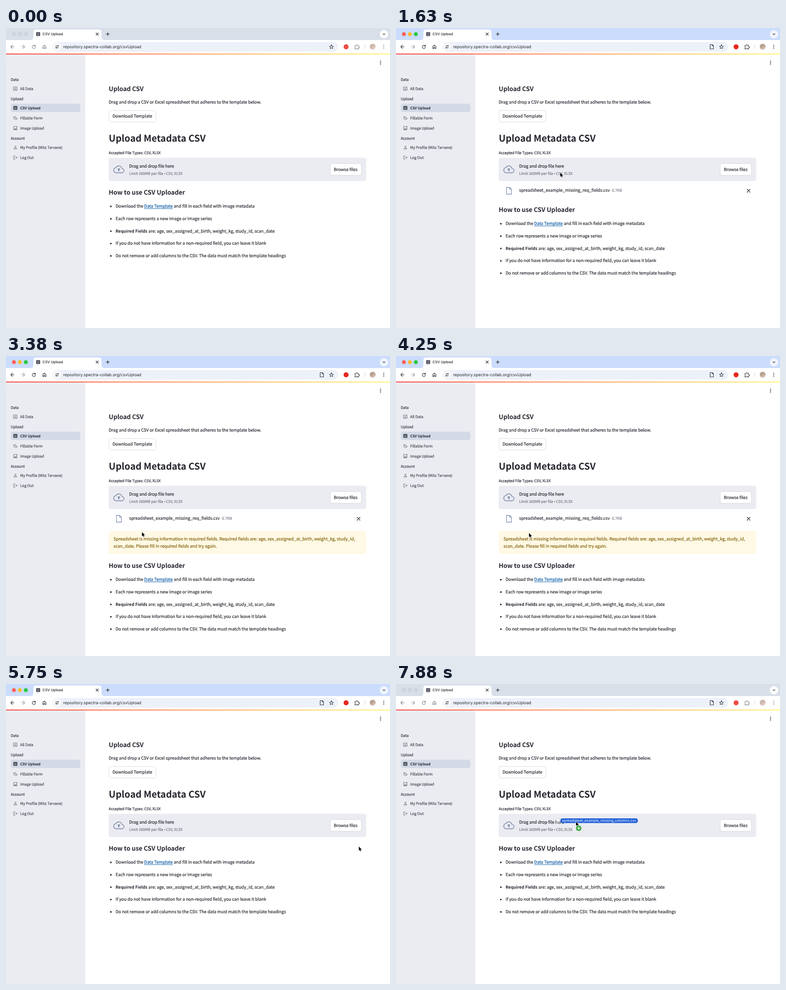
These frames come from a looping animation (800x623 px, 8 s). An HTML page with a canvas:

```html
<!DOCTYPE html>
<html lang="en">
<head>
<meta charset="utf-8">
<title>CSV Upload</title>
<style>
html, body { margin: 0; width: 100%; height: 100%; overflow: hidden; background: #fff; }
canvas { display: block; width: 800px; height: 623px; }
</style>
</head>
<body>
<canvas id="stage"></canvas>
<script>
const W = 800, H = 623, LOOP = 8000, STEP = 125;
const canvas = document.getElementById('stage');
const ctx = canvas.getContext('2d');
const dpr = window.devicePixelRatio || 1;
canvas.width = W * dpr;
canvas.height = H * dpr;

const PAGE_FONT = '"Noto Sans CJK JP", "Noto Sans CJK SC", "Noto Sans CJK KR", "Noto Sans", sans-serif';
const UI_FONT = 'Inter, Roboto, sans-serif';
const INK = '#262730', BODY = '#25262f', MUTED = '#777983', PANEL = '#ebecf1', STEEL = '#8592b3';
const BODY_SIZE = 8.83, SMALL = 7.7;

// Event times in ms
const DROP = 1250, FOCUS = 1375, FILE_IN = 1500, WARN_IN = 2000;
const HOVER = 5375, FILE_OUT = 5625, LEAVE = 6250, BLUR = 6500, DRAG_2 = 7250;

const PATH_1 = [
  [125, 650, 385], [500, 470, 322], [875, 367, 294.2], [1250, 345, 300],
  [2375, 336.5, 301], [2750, 300, 345], [3500, 280, 370], [4250, 277, 367.5],
  [4625, 330, 362], [5125, 640, 345], [5375, 735, 337.5], [5875, 735, 337.5],
  [6000, 750, 348], [6125, 778, 360], [6250, 800, 366]
];
const PATH_2 = [[7250, 690, 470], [7500, 540, 375], [7875, 375, 286]];

function along(path, t) {
  let i = 0;
  while (i < path.length - 2 && t > path[i + 1][0]) i++;
  const [t0, x0, y0] = path[i], [t1, x1, y1] = path[i + 1];
  const k = Math.min(1, Math.max(0, (t - t0) / (t1 - t0)));
  return [x0 + (x1 - x0) * k, y0 + (y1 - y0) * k];
}

// Text is placed by the middle of its capitals; returns the end x.
function text(str, x, mid, { size = BODY_SIZE, color = BODY, weight = 400, font = PAGE_FONT } = {}) {
  const baseline = mid + size * 0.345;
  ctx.font = `${weight} ${size}px ${font}`;
  ctx.fillStyle = color;
  ctx.fillText(str, x, baseline);
  if (font === PAGE_FONT && weight === 400) {
    // Slight emboldening, as with smoothed screen text
    ctx.strokeStyle = color;
    ctx.lineWidth = 0.2;
    ctx.strokeText(str, x, baseline);
  }
  return x + ctx.measureText(str).width;
}

function box(x, y, w, h, r, fill, stroke) {
  ctx.beginPath();
  ctx.roundRect(x, y, w, h, r);
  if (fill) { ctx.fillStyle = fill; ctx.fill(); }
  if (stroke) { ctx.strokeStyle = stroke; ctx.lineWidth = 0.8; ctx.stroke(); }
}

function dot(x, y, r, fill) {
  ctx.beginPath();
  ctx.arc(x, y, r, 0, Math.PI * 2);
  ctx.fillStyle = fill;
  ctx.fill();
}

// SVG path drawn around (x, y)
function glyph(d, x, y, { stroke, fill, width = 1.1, scale = 1 }) {
  const p = new Path2D(d);
  ctx.save();
  ctx.translate(x, y);
  ctx.scale(scale, scale);
  ctx.lineJoin = ctx.lineCap = 'round';
  if (fill) { ctx.fillStyle = fill; ctx.fill(p); }
  if (stroke) { ctx.strokeStyle = stroke; ctx.lineWidth = width; ctx.stroke(p); }
  ctx.restore();
}

const CROSS = 'M-3 -3L3 3M3 -3L-3 3';
const ARROW_LEFT = 'M3.5 0H-3.5M0 -3.5L-3.5 0L0 3.5';
const PAGE = 'M-3.5 -4.5H1L3.5 -2V4.5H-3.5ZM1 -4.5V-2H3.5';

function tableIcon(x, y) {
  box(x - 4, y - 4, 8, 8, 1, INK);
  ctx.fillStyle = '#e6e9f2';
  for (const row of [-2.4, -0.2, 2]) ctx.fillRect(x - 2.9, y + row, 5.8, 0.9);
}

function kebab(x, y, gap, r, color) {
  for (const k of [-1, 0, 1]) dot(x, y + k * gap, r, color);
}

function drawTabs(active) {
  ctx.fillStyle = active ? '#cbdcfc' : '#d8dfe9';
  ctx.fillRect(0, 0, W, 25);
  const lights = active ? ['#ff5f57', '#febc2e', '#28c840'] : Array(3).fill('#c5cbd4');
  lights.forEach((color, i) => {
    dot(16.5 + i * 12.4, 12.8, 4, color);
    if (!active) dot(16.5 + i * 12.4, 12.8, 3.3, '#d0d6df');
  });
  glyph('M51 25Q57 25 57 19V9Q57 3 63 3H193Q199 3 199 9V19Q199 25 205 25Z', 0, 0, { fill: '#fff' });
  tableIcon(67, 12.8);
  text('CSV Upload', 76, 12.5, { size: 7.4, color: '#202124', weight: 500, font: UI_FONT });
  glyph(CROSS, 190, 12.6, { stroke: '#303338', width: 1.4, scale: 0.8 });
  glyph('M-3.3 0H3.3M0 -3.3V3.3', 212, 12.6, { stroke: '#303338', width: 1.2 });
  dot(787.5, 12.8, 8.6, active ? '#eff4fe' : '#fff');
  glyph('M-2 -1L0 1L2 -1', 787.5, 12.8, { stroke: '#303338', width: 1.2 });
}

function drawToolbar(active, pageIcon) {
  const tone = active ? '#35383d' : '#85898f', faded = active ? '#9a9da2' : '#9b9fa5';
  ctx.fillStyle = '#fff';
  ctx.fillRect(0, 25, W, 29);
  glyph(ARROW_LEFT, 13.5, 39, { stroke: tone });
  glyph('M-3.5 0H3.5M0 -3.5L3.5 0L0 3.5', 35.5, 39, { stroke: faded });
  glyph('M2.6 -1.9A3.3 3.3 0 1 0 3.3 0.6M3.3 -3.6V-1.3H1', 58, 39, { stroke: tone });
  glyph('M-3.3 -0.6L0 -3.7L3.3 -0.6V3.8H1.1V1H-1.1V3.8H-3.3Z', 80, 39, { stroke: tone });

  box(97, 29, 595, 20, 10, '#edf1f9');
  dot(106.5, 39, 7.6, '#fff');
  glyph('M-3.5 -1.9H-1M2.8 -1.9H3.4M-3.5 2H-2.9M-0.3 2H3.5M2.3 -1.9A1.2 1.2 0 1 1 -0.1 -1.9A1.2 1.2 0 1 1 2.3 -1.9M-0.4 2A1.2 1.2 0 1 1 -2.8 2A1.2 1.2 0 1 1 -0.4 2',
    106.5, 39, { stroke: '#35383d', width: 1 });
  text('repository.spectra-collab.org/csvUpload', 119, 38.9, { size: 8.5, color: '#26282c', font: UI_FONT });
  if (pageIcon) glyph(PAGE, 658, 39, { stroke: '#35383d' });
  let star = '';
  for (let i = 0; i < 10; i++) {
    const a = i * Math.PI / 5 - Math.PI / 2, r = i % 2 ? 1.9 : 4.5;
    star += `${i ? 'L' : 'M'}${Math.cos(a) * r} ${Math.sin(a) * r}`;
  }
  glyph(star + 'Z', 678, 39.3, { stroke: '#35383d', width: 1 });

  dot(708.5, 39, 5.2, active ? '#e5281f' : '#ee4d43');
  glyph('M-4 -2.6H-1.5A1.4 1.4 0 1 1 1.3 -2.6H3.5V-0.2A1.4 1.4 0 1 1 3.5 2.4V4.6H-4V2.4A1.5 1.5 0 0 0 -4 -0.3Z',
    731, 38.8, { stroke: tone });
  ctx.fillStyle = '#d3dcec';
  ctx.fillRect(747, 34, 1, 10);
  const g = ctx.createLinearGradient(760, 33, 768, 45);
  g.addColorStop(0, '#a3a08a');
  g.addColorStop(0.5, '#c4a392');
  g.addColorStop(1, '#dedad4');
  ctx.globalAlpha = active ? 1 : 0.75;
  dot(764, 39, 6.2, g);
  ctx.globalAlpha = 1;
  kebab(787, 39, 3.3, 0.95, tone);
}

const NAV = [
  ['Data', 107], ['All Data', 126, 'chart'], ['Upload', 147], ['CSV Upload', 166, 'table'],
  ['Fillable Form', 187, 'form'], ['Image Upload', 208, 'image'], ['Account', 229],
  ['My Profile (Milo Tarvane)', 248, 'user'], ['Log Out', 269, 'exit']
];
const NAV_ICONS = {
  chart: 'M-3.5 -3.5H3.5V3.5H-3.5ZM-1.8 1.8V0M0 1.8V-1.8M1.8 1.8V0.8',
  form: 'M-4 -2.8H1.5M-4 -0.6H1.5M-4 1.6H-1M0.3 3L3.7 -0.2L4.2 0.8L1.3 3.4Z',
  image: 'M1 -3.5H-3.5V3.5H3.5V-0.5M-2.3 2L-0.7 0.2L0.4 1.2L1.3 0.3L2.4 2ZM3 -4V-1.6M1.8 -2.8H4.2',
  user: 'M1.4 -1.6A1.4 1.4 0 1 1 -1.4 -1.6A1.4 1.4 0 1 1 1.4 -1.6M-2.9 2.8V2Q0 0 2.9 2V2.8Z',
  exit: 'M-0.5 -3.5H-3.5V3.5H-0.5M-1.2 0H3.7M2 -1.8L3.8 0L2 1.8'
};

function drawSidebar() {
  ctx.fillStyle = PANEL;
  ctx.fillRect(0, 54, 165, H - 54);
  box(10, 157.3, 145, 17.2, 4.5, '#d3d9e6');
  for (const [label, y, icon] of NAV) {
    const current = icon === 'table';
    if (current) tableIcon(19.5, y);
    else if (icon) glyph(NAV_ICONS[icon], 19.5, y, { stroke: '#5c5e68', width: 0.8 });
    text(label, icon ? 29.5 : 10, y, {
      size: current ? 7.5 : SMALL, weight: current ? 700 : 400,
      color: current ? INK : icon ? '#454751' : '#363842'
    });
  }
}

function drawUploader() {
  text('Upload CSV', 214, 126.5, { size: 12.9, weight: 600, color: INK });
  text('Drag and drop a CSV or Excel spreadsheet that adheres to the template below.', 214, 153.5);
  box(214.4, 171.4, 98, 24, 4.5, '#fff', '#d2d3d8');
  text('Download Template', 222, 183.3);
  text('Upload Metadata CSV', 214, 229, { size: 19.25, weight: 600, color: INK });
  text('Accepted File Types: CSV, XLSX', 214, 259.3, { size: SMALL });
  box(214, 269.5, 536.5, 48.5, 4.5, PANEL);
  const cloud = 'M19.35 10.04C18.67 6.59 15.64 4 12 4 9.11 4 6.6 5.64 5.35 8.04 2.34 8.36 0 10.91 0 14c0 3.31 2.69 6 6 6h13c2.76 0 5-2.24 5-5 0-2.64-2.05-4.78-4.65-4.96z';
  glyph(cloud, 224.4, 282.8, { stroke: STEEL, width: 1.9, scale: 0.89 });
  glyph('M8 13h2.6v3.5h2.8v-3.5H16l-4-4z', 224.4, 282.8, { fill: STEEL, scale: 0.89 });
  text('Drag and drop file here', 256.5, 287);
  text('Limit 260MB per file • CSV, XLSX', 256.5, 302.7, { size: SMALL, color: MUTED });
  box(675.4, 281.4, 65, 24.4, 4.5, '#fff', '#d2d3d8');
  text('Browse files', 683, 293.7);
}

function drawFile(hover) {
  glyph('M-5 -7H1.5L5.2 -3.3V7H-5ZM1.5 -7V-3.3H5.2', 235.2, 338, { stroke: STEEL, width: 1.3 });
  const end = text('spreadsheet_example_missing_req_fields.csv', 256.5, 337);
  text('0.7KB', end + 4.8, 337, { size: SMALL, color: MUTED });
  glyph(CROSS, 734.5, 338, { stroke: hover ? '#f0503c' : '#26272c', width: 1.2 });
}

function drawWarning() {
  const color = '#7d5c00';
  box(214, 363, 536.5, 48, 4.5, '#fff9e5');
  text('Spreadsheet is missing information in required fields. Required fields are: age, sex_assigned_at_birth, weight_kg, study_id,', 224, 380, { color });
  text('scan_date. Please fill in required fields and try again.', 224, 394.8, { color });
}

function drawGuide(dy) {
  text('How to use CSV Uploader', 214, 341.5 + dy, { size: 12.9, weight: 600, color: INK });
  const rows = [
    null,
    'Each row represents a new image or image series',
    null,
    'If you do not have information for a non-required field, you can leave it blank',
    'Do not remove or add columns to the CSV. The data must match the template headings'
  ];
  const x = 228.3;
  rows.forEach((row, i) => {
    const y = 370.2 + i * 25.7 + dy;
    dot(218.5, y + 0.3, 1.7, INK);
    if (row) { text(row, x, y); return; }
    if (i === 0) {
      const start = text('Download the ', x, y);
      const end = text('Data Template', start, y, { color: '#0054a3' });
      ctx.fillRect(start, y + 4.4, end - start, 0.9);
      text(' and fill in each field with image metadata', end, y);
    } else {
      const end = text('Required Fields', x, y, { weight: 600, size: 8.7 });
      text(' are: age, sex_assigned_at_birth, weight_kg, study_id, scan_date', end, y);
    }
  });
}

function drawArrow(x, y) {
  const shape = 'M0 0V8.6L2 6.9L3.4 10L4.8 9.4L3.5 6.4L6.1 6.2Z';
  glyph(shape, x, y, { stroke: '#fff', width: 1.4 });
  glyph(shape, x, y, { fill: '#000' });
}

function drawHand(x, y) {
  glyph('M-0.9 5.5V0.7Q0 -0.7 0.9 0.7V3.7L5 4.4Q6 4.8 5.7 6.4L4.8 9.8H0L-2.9 6.2Q-2.9 4.8 -0.9 5.8M2.4 4.3V5.6M3.9 4.5V5.8',
    x, y, { fill: '#fff', stroke: '#111', width: 0.85 });
}

function drawDrag(x, y, name, offset) {
  const size = 7.45;
  ctx.font = `400 ${size}px ${UI_FONT}`;
  const left = x - offset, width = ctx.measureText(name).width + 6.5;
  box(left - 9, y - 7, 7.5, 9.5, 1, 'rgba(250,250,252,.5)', 'rgba(160,164,172,.4)');
  ctx.fillStyle = 'rgba(120,124,134,.4)';
  ctx.fillRect(left - 7, y, 3.5, 0.8);
  box(left, y - 7, width, 9.8, 4.6, '#2161d8');
  text(name, left + 3.2, y - 2.2, { size, color: '#fff', font: UI_FONT });
  drawArrow(x, y);
  dot(x + 5.6, y + 13.5, 6.1, '#d5e3d3');
  dot(x + 5.6, y + 13.5, 5.5, '#27a329');
  glyph('M-3 0H3M0 -3V3', x + 5.6, y + 13.5, { stroke: '#fff', width: 1.5 });
}

function drawPointer(t) {
  if (t >= DRAG_2) {
    drawDrag(...along(PATH_2, t), 'spreadsheet_example_missing_columns.csv', 32.5);
  } else if (t >= STEP && t < LEAVE) {
    const [x, y] = along(PATH_1, t);
    if (t < DROP) drawDrag(x, y, 'spreadsheet_example_missing_req_fields.csv', 44.5);
    else if (t >= HOVER && t < FILE_OUT) drawHand(x, y);
    else drawArrow(x, y);
  }
}

function draw(t) {
  const active = t >= FOCUS && t < BLUR;
  const hasFile = t >= FILE_IN && t < FILE_OUT;
  const warned = t >= WARN_IN && t < FILE_OUT;

  ctx.setTransform(dpr, 0, 0, dpr, 0, 0);
  ctx.textRendering = 'geometricPrecision';
  ctx.lineJoin = 'round';
  ctx.fillStyle = '#fff';
  ctx.fillRect(0, 0, W, H);
  drawSidebar();
  drawTabs(active);
  drawToolbar(active, t >= FILE_IN);

  const stripe = ctx.createLinearGradient(0, 0, W, 0);
  stripe.addColorStop(0, '#fb4b4b');
  stripe.addColorStop(1, '#fff67c');
  ctx.fillStyle = stripe;
  ctx.fillRect(0, 53, W, 2);
  kebab(780.3, 72, 3.1, 1, INK);

  drawUploader();
  if (hasFile) drawFile(t >= HOVER);
  if (warned) drawWarning();
  drawGuide(warned ? 94 : hasFile ? 36 : 0);
  drawPointer(t);
}

const start = performance.now();
function tick() {
  const t = (performance.now() - start) % LOOP;
  draw(Math.min(LOOP - STEP, Math.floor((t + 5) / STEP) * STEP));
  requestAnimationFrame(tick);
}
tick();
</script>
</body>
</html>
```
